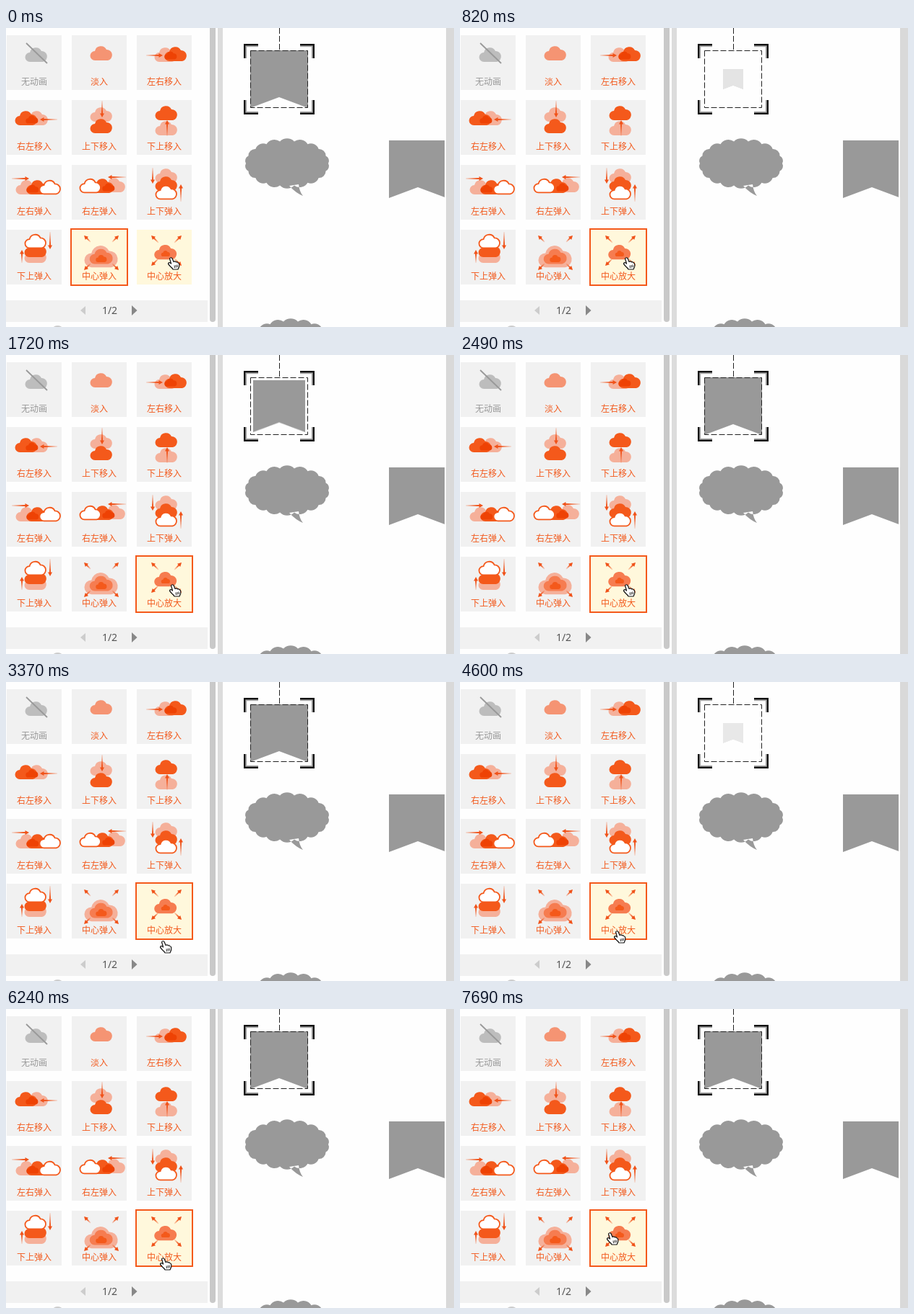
An HTML page for the animation above (8 s loop, 620x415 px).

```html
<!DOCTYPE html>
<html lang="zh-CN">
<head>
<meta charset="utf-8">
<title>动画面板</title>
<style>
html, body { margin: 0; width: 100%; height: 100%; overflow: hidden; background: #fefefe; }
svg { display: block; }
text { font: 12px "Noto Sans CJK SC", "Noto Sans CJK", sans-serif; text-anchor: middle; fill: #f2591c; }
.page { font: 14px "Noto Sans", sans-serif; fill: #555; }
</style>
</head>
<body>
<svg id="stage" width="620" height="415" viewBox="0 0 620 415">
  <defs>
    <path id="cloud" d="M-9 10a6.5 6.5 0 0 1 0-13a8.5 8.5 0 0 1 16-2a7.6 7.6 0 0 1 2 15z"/>
    <path id="ribbon" d="M-40-40H40V40L0 25L-40 40z" fill="#999"/>
    <g id="corner" fill="none">
      <path d="M20 3.2H3.2V20" stroke="#aaa" stroke-width="2"/>
      <path d="M20 1.2H1.2V20" stroke="#111" stroke-width="2.4"/>
    </g>
    <linearGradient id="fade">
      <stop offset="0" stop-color="#f0531a" stop-opacity=".15"/>
      <stop offset=".8" stop-color="#f0531a"/>
    </linearGradient>
  </defs>

  <g id="tiles"></g>

  <rect y="378" width="279" height="30" fill="#f1f1f1"/>
  <path d="M110 386v12l-7-6z" fill="#ccc"/>
  <path d="M174 385v14l7.5-7z" fill="#888"/>
  <text class="page" x="143.500" y="397">1/2</text>
  <ellipse cx="71.500" cy="416" rx="6" ry="3" fill="#ccc"/>
  <rect x="282" y="-10" width="8" height="418" rx="4" fill="#c9c9c9"/>
  <rect x="293" width="7" height="415" fill="#dcdcdc"/>

  <path id="bubble" fill="#999"/>
  <use href="#bubble" x="5" y="250"/>
  <use href="#ribbon" x="570" y="196"/>
  <rect x="607" width="3" height="415" fill="#fefefe"/>
  <rect x="609" width="11" height="415" fill="#d9d9d9"/>

  <g id="show"><use id="zoom" href="#ribbon"/></g>
  <path d="M378.500 0V31M338.500 31.500H417.500V110.500H338.500z" fill="none" stroke="#222" stroke-dasharray="8 3"/>
  <g id="corners"></g>

  <g id="hand" stroke="#111" stroke-width="1.200" stroke-linejoin="round">
    <path fill="#fff" d="M-5.500-7Q-4-9.500-1.800-7L0-2.500Q2-4 3.500-2Q5-3 6-1Q7.700-1 7.700 1V4L6 8H-1Q-2 6-4.500 4L-7.500 .5Q-7.500-2-4.500-1L-3.500 0z"/>
    <path fill="none" stroke-width=".9" d="M1 2.500l.6 3.500M3 2l.6 3.500M5 1.500l.5 3.500"/>
  </g>
</svg>
<script>
const LOOP = 8000;
const $ = id => document.getElementById(id);
const MAIN = '#f4591b', DEEP = '#ee4204', PALE = '#f5b09a', SOFT = '#f59473', MID = '#f67c50';

const cloud = (x, y, fill, s = 1) =>
  `<use href="#cloud" transform="translate(${x} ${y}) scale(${s})" fill="${fill}"/>`;
const hollow = (x, y) =>
  `<use href="#cloud" transform="translate(${x} ${y}) scale(.94)" fill="#fff" stroke="${MAIN}" stroke-width="1.9"/>`;

// Arrow with a faded tail, ending at (x2, y2)
function arrow(x1, y1, x2, y2) {
  const len = Math.hypot(x2 - x1, y2 - y1);
  const deg = Math.atan2(y2 - y1, x2 - x1) * 180 / Math.PI;
  return `<g transform="translate(${x1} ${y1}) rotate(${deg})">
    <path d="M0-.7L${len - 4}-1V1L0 .7z" fill="url(#fade)"/>
    <path d="M${len} 0l-5.500-3v6z" fill="#f0531a"/></g>`;
}
const spread = (cx, cy, r0, r1) => [[-1, -1], [1, -1], [-1, 1], [1, 1]]
  .map(([a, b]) => arrow(cx + a * r0, cy + b * r0, cx + a * r1, cy + b * r1)).join('');

const tiles = [
  ['无动画', cloud(41, 27, '#bdbdbd') + '<path d="M27 11L56 39" stroke="#999" stroke-width="1.8"/>'],
  ['淡入', cloud(41, 25, SOFT)],
  ['左右移入', cloud(40, 27, PALE) + cloud(54, 26, MAIN) + cloud(47, 28, DEEP, .56) + arrow(13, 28, 36, 28)],
  ['右左移入', cloud(42, 25, PALE) + cloud(27, 25, MAIN) + cloud(35, 27, DEEP, .56) + arrow(70, 27, 46, 27)],
  ['上下移入', cloud(41, 20, PALE) + cloud(41, 36, MAIN) + arrow(42, 1, 42, 24)],
  ['下上移入', cloud(41, 39, PALE) + cloud(41, 18, MAIN) + arrow(42, 50, 42, 28)],
  ['左右弹入', cloud(28, 31, PALE) + cloud(43, 31, MAIN) + cloud(36, 33, DEEP, .56) + hollow(60, 31) + arrow(7, 19, 31, 19)],
  ['右左弹入', cloud(59, 28, PALE) + cloud(43, 29, MAIN) + cloud(51, 31, DEEP, .56) + hollow(26, 29) + arrow(75, 17, 50, 17)],
  ['上下弹入', cloud(41, 15, PALE) + cloud(41, 26, MAIN) + hollow(41, 38) + arrow(22, 4, 22, 26) + arrow(61, 51, 61, 27)],
  ['下上弹入', cloud(40, 36, PALE) + cloud(40, 28, MAIN) + hollow(40, 16) + arrow(60, 3, 60, 27) + arrow(21, 46, 21, 28)],
  ['中心弹入', cloud(41, 37, PALE, 1.52) + cloud(41, 37, MID, 1.05) + cloud(41, 40, MAIN, .5) + spread(41, 32, 15, 24)],
  ['中心放大', spread(41, 29, 11, 21) + cloud(40, 31, MID, 1.02) + cloud(40, 33, MAIN, .4)]
];
const frame = (id, fill) =>
  `<rect id="${id}" x="-1" y="-1" width="78" height="78" fill="${fill}" stroke="${MAIN}" stroke-width="2"/>`;
const YELLOW = '#fff8dc';

$('tiles').innerHTML = tiles.map(([label, icon], i) => {
  const x = 1 + i % 3 * 90, y = 10 + Math.floor(i / 3) * 90;
  const mark = i === 10 ? frame('oldPick', YELLOW) : i === 11 ? frame('newPick', 'none') : '';
  return `<g transform="translate(${x} ${y})">
    <rect width="76" height="76" fill="${i === 11 ? YELLOW : '#f1f1f1'}"/>${mark}${icon}
    <text x="38" y="69"${i ? '' : ' style="fill:#999"'}>${label}</text></g>`;
}).join('');

$('corners').innerHTML = [[329, 22, 1, 1], [427, 22, -1, 1], [329, 120, 1, -1], [427, 120, -1, -1]]
  .map(([x, y, a, b]) => `<use href="#corner" transform="translate(${x} ${y}) scale(${a} ${b})"/>`).join('');

// Scalloped speech bubble: arcs strung along an ellipse
function bubblePath(cx, cy, rx, ry, n) {
  const pt = i => [cx + rx * Math.cos(i * 2 * Math.PI / n), cy + ry * Math.sin(i * 2 * Math.PI / n)];
  let d = 'M' + pt(0);
  for (let i = 1; i <= n; i++) {
    const [x0, y0] = pt(i - 1), [x, y] = pt(i);
    const r = .68 * Math.hypot(x - x0, y - y0);
    d += `A${r} ${r} 0 0 1 ${x} ${y}`;
  }
  return d + 'zM392 219Q401 229 411 233Q406 227 405 217z';
}
$('bubble').setAttribute('d', bubblePath(389, 188, 57, 31, 18));

// steps: [time, value, easing until the next step]
function track(el, prop, steps) {
  const last = steps[steps.length - 1];
  const keys = [...steps, [LOOP, last[1]]].map(([t, v, easing = 'linear']) =>
    ({ offset: t / LOOP, [prop]: v, easing }));
  el.animate(keys, { duration: LOOP, iterations: Infinity }).startTime = 0;
}
const HOLD = 'steps(1, end)';
const size = s => `translate(378px, 71px) scale(${s})`;
const at = (x, y) => `translate(${x}px, ${y}px)`;

track($('oldPick'), 'opacity', [[0, 1, HOLD], [400, 0]]);
track($('newPick'), 'opacity', [[0, 0, HOLD], [400, 1]]);
track($('show'), 'opacity', [[0, 1, HOLD], [650, 0, HOLD], [820, 1, HOLD], [4420, 0, HOLD], [4600, 1]]);
track($('zoom'), 'transform', [[0, size(1), HOLD], [648, size(.3), 'ease'], [2545, size(1), HOLD],
  [4445, size(.3), 'ease'], [6310, size(1)]]);
track($('zoom'), 'opacity', [[0, 1, HOLD], [648, 0, 'ease'], [1596, 1, HOLD], [4445, 0, 'ease'], [5378, 1]]);
track($('hand'), 'transform', [
  [0, at(232, 327), HOLD], [300, at(233, 327), HOLD], [500, at(234, 327), HOLD],
  [2920, at(234, 327)], [3050, at(250, 335)], [3150, at(262, 358)], [3230, at(256, 385)],
  [3290, at(240, 396)], [3370, at(221, 368)], [3460, at(220, 354), HOLD], [3970, at(221, 354), HOLD],
  [6910, at(221, 354)], [7040, at(230, 372)], [7150, at(244, 379)], [7260, at(254, 362)],
  [7360, at(248, 338)], [7450, at(228, 322)], [7550, at(211, 319)]
]);
// Align every track to one clock that starts with the page
const start = document.timeline.currentTime || 0;
document.getAnimations().forEach(a => { a.startTime = start; });
</script>
</body>
</html>
```
